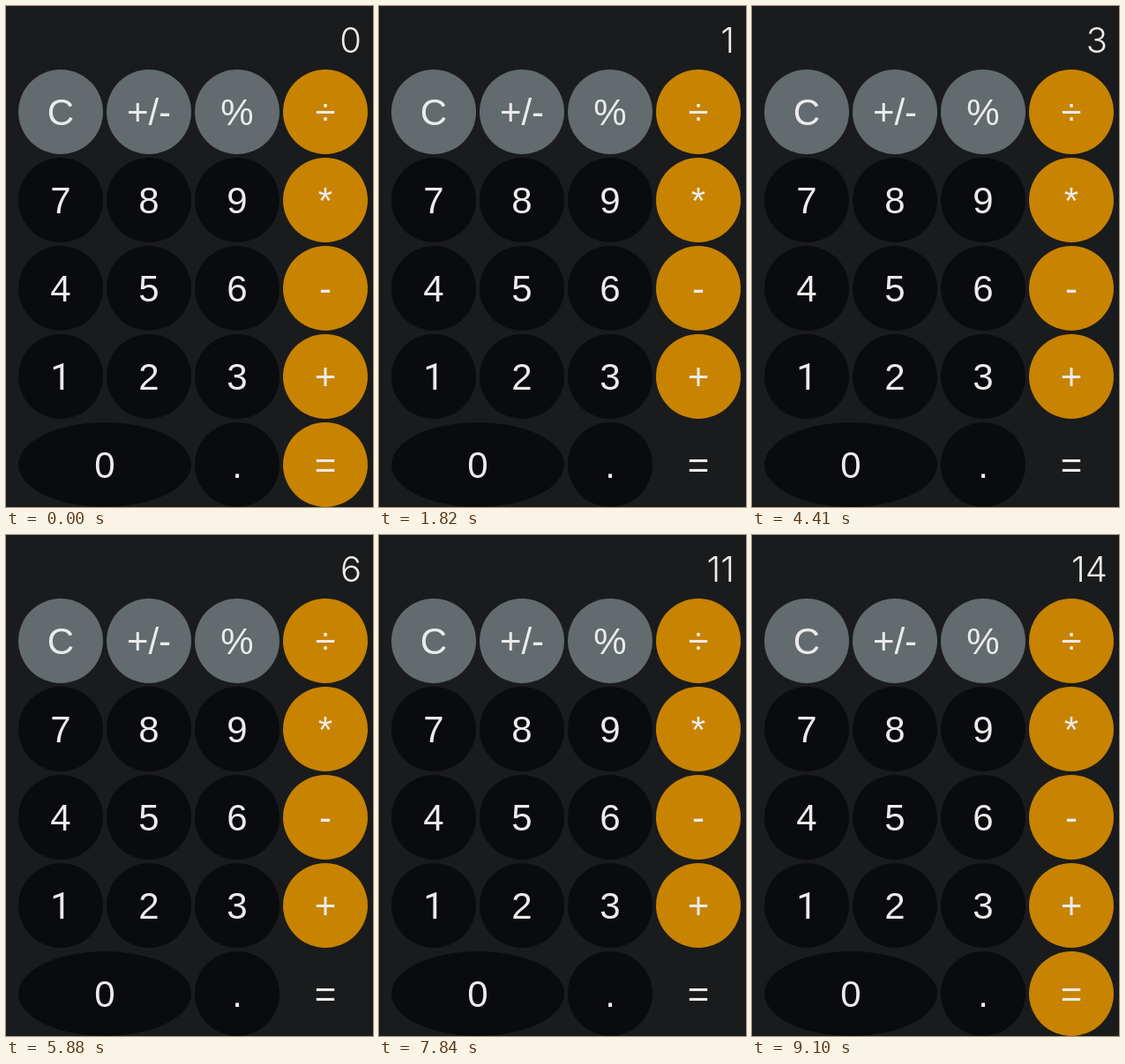
An HTML page that plays this animation: 416 px wide and 568 px high, repeating every 9170 ms.

```html
<!DOCTYPE html>
<html lang="en">
<head>
<meta charset="utf-8">
<title>Calculator</title>
<style>
  html, body { margin: 0; width: 100%; height: 100%; overflow: hidden; background: #1a1b1c; }
  svg { display: block; width: 416px; height: 568px; }
  text { fill: #ebebeb; font: 42px "Liberation Sans", Arial, sans-serif; text-anchor: middle; }
  .plain { font-family: Roboto, sans-serif; }
  #display { font: 300 40px Inter, sans-serif; text-anchor: end; }
  .top { fill: #636b6e; }
  .num { fill: #0a0b0e; }
  .op { fill: #c88300; }
  .hover { fill: none; }
</style>
</head>
<body>
<svg viewBox="0 0 416 568">
  <g id="keys"></g>
  <text id="display" x="403" y="52.5">0</text>
</svg>
<script>
const LOOP = 9170;
const rows = [
  ['C', '+/-', '%', '÷'],
  ['7', '8', '9', '*'],
  ['4', '5', '6', '-'],
  ['1', '2', '3', '+'],
  ['0', '', '.', '=']
];
// Moments at which the count goes up by one
const ticks = [1470, 3010, 3990, 4620, 5180, 5880, 6440, 6860, 7280, 7630, 7840, 8050, 8190, 8400];
const hovers = { '.': [1610, 1820], '=': [1820, 8610] };

const keys = document.getElementById('keys');
const display = document.getElementById('display');
const shapes = {};

function add(tag, attrs) {
  const el = document.createElementNS('http://www.w3.org/2000/svg', tag);
  for (const name in attrs) el.setAttribute(name, attrs[name]);
  return keys.appendChild(el);
}

rows.forEach((row, r) => row.forEach((label, c) => {
  if (!label) return;
  const wide = label === '0';
  const x = 62 + c * 100 + (wide ? 50 : 0);
  const y = 120 + r * 100;
  const kind = c === 3 ? 'op' : r === 0 ? 'top' : 'num';
  shapes[label] = add('ellipse', { cx: x, cy: y, rx: wide ? 98 : 48, ry: 48, class: kind });
  const text = add('text', { x, y: y + 14.5 });
  text.textContent = label;
  if (label === '1') text.classList.add('plain');
}));

function draw(now) {
  const t = now % LOOP;
  const count = String(ticks.filter(at => t >= at).length);
  if (display.textContent !== count) display.textContent = count;
  for (const label in hovers) {
    const [from, to] = hovers[label];
    shapes[label].classList.toggle('hover', t >= from && t < to);
  }
}

const start = performance.now();
function frame() {
  draw(performance.now() - start);
  requestAnimationFrame(frame);
}
frame();
</script>
</body>
</html>
```
